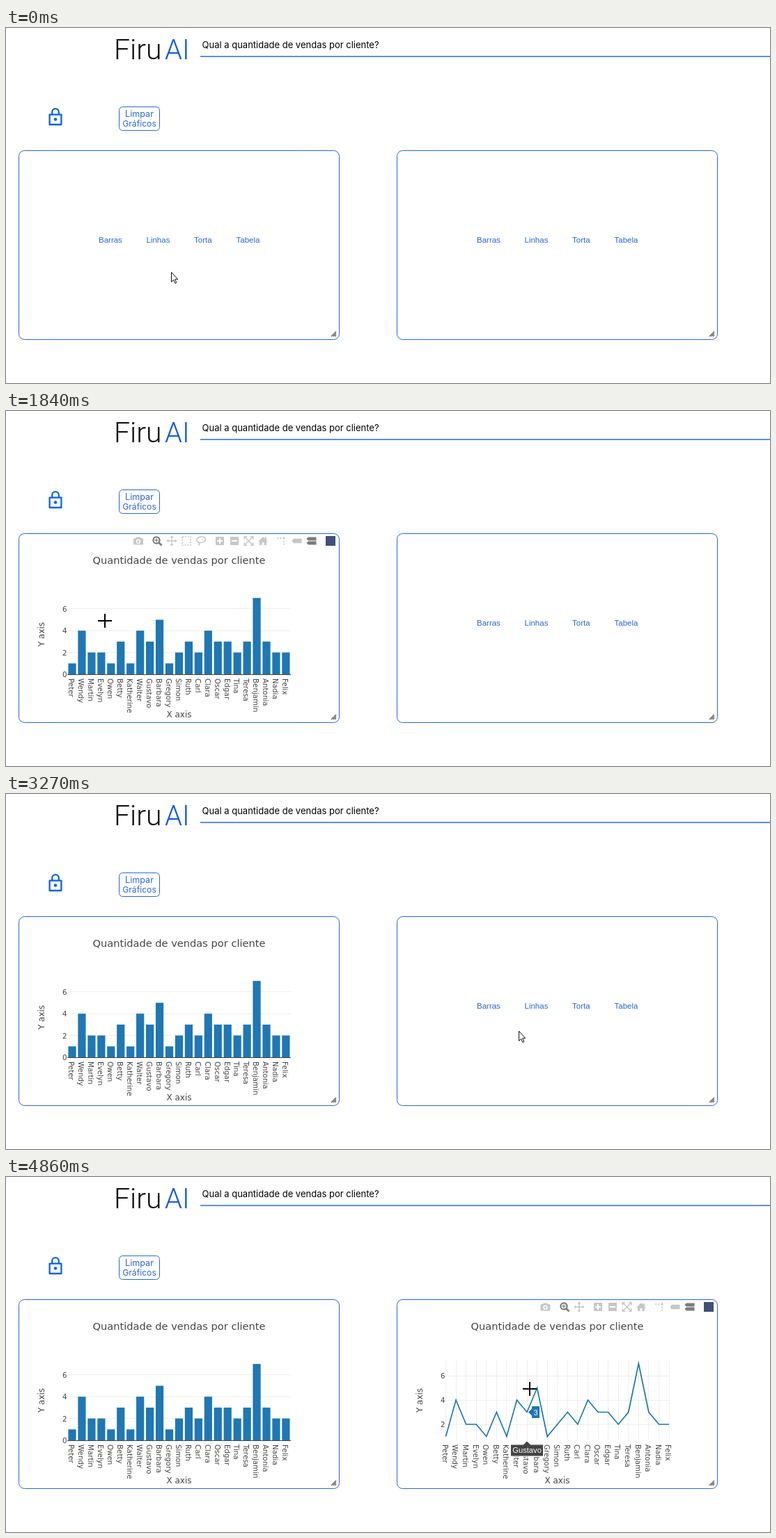
An HTML page with a canvas for the animation above (5.2 s loop, 1097 by 511 pixels).

```html
<!DOCTYPE html>
<html lang="pt">
<head>
<meta charset="utf-8">
<title>Vendas por cliente</title>
<style>
  html, body { margin: 0; width: 100%; height: 100%; overflow: hidden; background: #fff; }
  canvas { display: block; }
</style>
</head>
<body>
<canvas id="stage" width="1097" height="511"></canvas>
<script>
const ctx = document.getElementById('stage').getContext('2d');
const LOOP = 5200, SHIFT = 543;
const BLUE = '#1459e6', EDGE = '#2b66dc', PLOT = '#1f77b4', INK = '#444';
const ARIAL = '"Liberation Sans", Arial, sans-serif';
const VERDANA = '"DejaVu Sans", Verdana, sans-serif';
const INTER = 'Inter, sans-serif';

const names = ('Peter Wendy Martin Evelyn Owen Betty Katherine Walter Gustavo Barbara Gregory Simon ' +
  'Ruth Carl Clara Oscar Edgar Tina Teresa Benjamin Antonia Nadia Felix').split(' ');
const sales = [...'14221314351232433237322'].map(Number);
const options = [['Barras', 133], ['Linhas', 201.5], ['Torta', 270], ['Tabela', 330.5]];

const bars = { x: i => 95 + i * 13.95, y: v => 379 - v * 15.7 };
const lines = { x: i => 631.5 + i * 14.57, y: v => 391 - v * 17.5 };

// Pointer path: time, x, y
const path = [
  [0, 237, 351], [20, 237, 351], [300, 186, 337], [540, 151, 321], [680, 146, 310.5],
  [1080, 142, 302], [1930, 142, 302], [2030, 146, 302], [2180, 196, 308], [2340, 276, 322],
  [2430, 320, 328], [2570, 401, 338], [2800, 560, 360], [3110, 709, 369], [3270, 736, 341],
  [3420, 745, 321], [3650, 753, 309], [4790, 753, 309], [4860, 752, 305], [LOOP, 752, 305]
];
const shapes = [
  [550, 'arrow'], [1510, 'hand'], [1550, 'arrow'], [2590, 'cross'],
  [3415, 'arrow'], [4100, 'hand'], [4180, 'arrow'], [LOOP, 'cross']
];

const arrow = new Path2D('M.5 .5V14.5L3.5 11.6L5.8 16.6L7.8 15.7L5.6 10.8H9.8Z');
const hand = new Path2D('M-1.6 12V1.5a1.6 1.6 0 0 1 3.2 0V7q1.5-.9 2.7.4q1.6-.7 2.5.7q2-.2 2 1.8V13' +
  'q0 2-1.3 4V19.5H-1.2q-.8-3-3.4-5.6q-2.6-3.4-1-4q1.4-.4 4 2.1Z');
const home = new Path2D('M-7 1L0-6L2.8-3.2V-5H5V-1L7 1H5V6H1.5V2H-1.5V6H-5V1Z');
const lasso = new Path2D('M-3.5 2C-9-1-5-6 1-6S9 0 2 2C0 3-3 3-4 1.5M-3.5 2q2 2 0 4.5');
const lock = new Path2D('M-7 9H7V21H-7ZM-4 9V6a4 4 0 0 1 8 0V9');

const clamp = v => Math.max(0, Math.min(1, v));
const crisp = v => Math.floor(v) + .5;

// CSS "ease"
function ease(x) {
  x = clamp(x);
  let lo = 0, hi = 1, s = 0;
  for (let i = 0; i < 20; i++) {
    s = (lo + hi) / 2;
    const bx = .75 * s * (1 - s) ** 2 + .75 * s * s * (1 - s) + s ** 3;
    if (bx < x) lo = s; else hi = s;
  }
  return .3 * s * (1 - s) ** 2 + 3 * s * s * (1 - s) + s ** 3;
}

function pointer(t) {
  const i = Math.max(1, path.findIndex(p => p[0] >= t));
  const [t0, x0, y0] = path[i - 1], [t1, x1, y1] = path[i];
  const k = clamp((t - t0) / (t1 - t0));
  return [x0 + (x1 - x0) * k, y0 + (y1 - y0) * k];
}

function text(str, x, y, font, color, align = 'left') {
  ctx.font = font;
  ctx.fillStyle = color;
  ctx.textAlign = align;
  ctx.fillText(str, x, y);
}

function turned(str, x, y, angle, font, align) {
  ctx.save();
  ctx.translate(x, y);
  ctx.rotate(angle);
  text(str, 0, 0, font, INK, align);
  ctx.restore();
}

function rounded(x, y, w, h, r) {
  ctx.beginPath();
  ctx.roundRect(x, y, w, h, r);
}

function line(color, width, ...pts) {
  ctx.strokeStyle = color;
  ctx.lineWidth = width;
  ctx.beginPath();
  pts.forEach(p => ctx.lineTo(...p));
  ctx.stroke();
}

function shape(fill, stroke, pts) {
  ctx.beginPath();
  pts.forEach(p => ctx.lineTo(...p));
  ctx.closePath();
  ctx.fillStyle = fill;
  ctx.fill();
  ctx.strokeStyle = stroke;
  ctx.lineWidth = 1;
  ctx.stroke();
}

function padlock() {
  ctx.save();
  ctx.translate(71, 113.8);
  ctx.scale(1.2, 1.2);
  ctx.strokeStyle = ctx.fillStyle = '#0d62e6';
  ctx.lineWidth = 1.9;
  ctx.lineJoin = 'round';
  ctx.stroke(lock);
  ctx.beginPath();
  ctx.arc(0, 14.8, 1.9, 0, 7);
  ctx.fill();
  ctx.restore();
}

function header() {
  text('Firu', 155, 45, '300 41px Roboto, sans-serif', '#111');
  text('AI', 228, 45, '300 40px Roboto, sans-serif', BLUE);
  text('Qual a quantidade de vendas por cliente?', 281.5, 28.5, `400 13px ${INTER}`, '#000');
  line(EDGE, 1.3, [279, 41], [1097, 41]);
  padlock();
  ctx.strokeStyle = EDGE;
  ctx.lineWidth = 1;
  rounded(162.5, 113.5, 58, 34, 5);
  ctx.stroke();
  text('Limpar', 191.5, 128, `400 12.6px ${INTER}`, EDGE, 'center');
  text('Gráficos', 191.5, 142, `400 12.2px ${INTER}`, EDGE, 'center');
}

function panel(ox) {
  ctx.strokeStyle = EDGE;
  ctx.lineWidth = 1;
  rounded(18.5 + ox, 176.5, 460, 272, 8);
  ctx.stroke();
  for (const d of [7, 4.5, 2]) line('#555', 1.1, [474 + ox - d, 444], [474 + ox, 444 - d]);
}

function menu(ox, active, fill) {
  const words = color => options.forEach(([w, x]) => text(w, x + ox, 309, `11.5px ${ARIAL}`, color));
  words(EDGE);
  if (fill <= 0) return;
  const left = options[active][1] - 16.5 + ox;
  ctx.save();
  ctx.beginPath();
  ctx.rect(left, 290, 68 * fill, 31);
  ctx.clip();
  ctx.fillStyle = BLUE;
  rounded(left, 290.6, 68, 29.6, 5);
  ctx.fill();
  words('#fff');
  ctx.restore();
}

function titles(ox) {
  text('Quantidade de vendas por cliente', 248.5 + ox, 220, `14.6px ${VERDANA}`, INK, 'center');
  text('X axis', 248.5 + ox, 441, `12px ${VERDANA}`, INK, 'center');
  turned('Y axis', 55 + ox, 321.5, -Math.PI / 2, `12px ${VERDANA}`, 'center');
}

function ticks(scale, right, values) {
  const font = `10.3px ${VERDANA}`;
  values.forEach(v => text(v, right, scale.y(v) + 4, font, INK, 'right'));
  names.forEach((n, i) => turned(n, scale.x(i) - 4.7, 385, Math.PI / 2, font, 'left'));
}

function barChart() {
  titles(0);
  [2, 4, 6].forEach(v => line('#eee', 1, [88, crisp(bars.y(v))], [409, crisp(bars.y(v))]));
  ctx.fillStyle = PLOT;
  sales.forEach((v, i) => ctx.fillRect(bars.x(i) - 5.6, bars.y(v), 11.2, 379 - bars.y(v)));
  line(INK, 1, [88, 379.5], [409, 379.5]);
  ticks(bars, 87.5, [0, 2, 4, 6]);
}

function lineChart() {
  titles(SHIFT);
  names.forEach((n, i) => line('#eee', 1, [crisp(lines.x(i)), 264], [crisp(lines.x(i)), 379]));
  [2, 4, 6].forEach(v => line('#eee', 1, [631, crisp(lines.y(v))], [952, crisp(lines.y(v))]));
  line(PLOT, 1.7, ...sales.map((v, i) => [lines.x(i), lines.y(v)]));
  ticks(lines, 630.5, [2, 4, 6]);
}

// Toolbar icons, each drawn around its own centre
const icons = {
  camera() {
    rounded(-7, -4, 14, 9.5, 1.5);
    ctx.fill();
    ctx.fillRect(-3, -5.5, 6, 2);
    ctx.fillStyle = '#fff';
    ctx.beginPath();
    ctx.arc(0, .8, 3.2, 0, 7);
    ctx.fill();
    ctx.fillStyle = '#c7c7c7';
    ctx.beginPath();
    ctx.arc(0, .8, 1.7, 0, 7);
    ctx.fill();
  },
  zoom(c) {
    ctx.lineWidth = 2.2;
    ctx.beginPath();
    ctx.arc(-1, -1, 4.6, 0, 7);
    ctx.stroke();
    line(c, 2.6, [2.5, 2.5], [6.5, 6.5]);
    line(c, 1.3, [-3.5, -1], [1.5, -1]);
    line(c, 1.3, [-1, -3.5], [-1, 1.5]);
  },
  pan(c) {
    line(c, 1.4, [-6, 0], [6, 0]);
    line(c, 1.4, [0, -6], [0, 6]);
    for (let i = 0; i < 4; i++) {
      ctx.rotate(Math.PI / 2);
      shape(c, c, [[5, -1.7], [7, 0], [5, 1.7]]);
    }
  },
  select() {
    ctx.lineWidth = 1.6;
    ctx.setLineDash([2, 1.8]);
    ctx.strokeRect(-6, -6, 12, 12);
  },
  lasso() { ctx.lineWidth = 1.6; ctx.stroke(lasso); },
  plus() { icons.minus(); ctx.fillRect(-1, -4, 2, 8); },
  minus() {
    rounded(-6, -6, 12, 12, 1);
    ctx.fill();
    ctx.fillStyle = '#fff';
    ctx.fillRect(-4, -1, 8, 2);
  },
  fit(c) {
    line(c, 1.5, [-5.5, -5.5], [5.5, 5.5]);
    line(c, 1.5, [-5.5, 5.5], [5.5, -5.5]);
    for (let i = 0; i < 4; i++) {
      ctx.rotate(Math.PI / 2);
      line(c, 1.6, [-6.2, -2.5], [-6.2, -6.2], [-2.5, -6.2]);
    }
  },
  home() { ctx.fill(home); },
  spike(c) {
    ctx.setLineDash([1.8, 2]);
    line(c, 1.8, [-5.5, -4], [2, -4]);
    line(c, 1.8, [4, 0], [4, 6]);
    ctx.fillRect(2.5, -5.5, 3, 3);
  },
  tag() { tag(0, 3.3); },
  tags() { tag(-3, 2.4); tag(3, 2.4); },
  square() { ctx.fillStyle = '#40507a'; ctx.fillRect(-7, -7, 14, 14); }
};

function tag(y, h) {
  ctx.beginPath();
  [[-7, 0], [-4.5, -h], [7, -h], [7, h], [-4.5, h]].forEach(([a, b]) => ctx.lineTo(a, y + b));
  ctx.fill();
}

function toolbar(ox, alpha, full) {
  if (alpha <= 0) return;
  const items = [['camera', full ? 190 : 231.5], ['zoom', full ? 217 : 259], ['pan', full ? 238 : 280],
    ['plus', 307], ['minus', 328], ['fit', 348.5], ['home', 369], ['spike', 395], ['tag', 417.5],
    ['tags', 438.5], ['square', 466]];
  if (full) items.push(['select', 259], ['lasso', 280]);
  for (const [kind, x] of items) {
    const color = kind === 'zoom' || kind === 'tags' ? '#7c7c7c' : '#c7c7c7';
    ctx.save();
    ctx.globalAlpha = alpha;
    ctx.translate(x + ox, 187);
    ctx.fillStyle = ctx.strokeStyle = color;
    icons[kind](color);
    ctx.restore();
  }
}

function hover(scale, i, edge) {
  const cx = scale.x(i), x = cx + edge, y = scale.y(sales[i]);
  const font = `11.2px ${ARIAL}`;
  shape(PLOT, '#fff', [[0, 0], [5, -5], [5, -9], [17, -9], [17, 9], [5, 9], [5, 5]].map(([a, b]) => [x + a, y + b]));
  text(sales[i], x + 11, y + 4, font, '#fff', 'center');
  ctx.font = font;
  const w = ctx.measureText(names[i]).width / 2 + 2.7;
  shape(INK, '#fff', [[0, 380], [5, 385], [w, 385], [w, 402], [-w, 402], [-w, 385], [-5, 385]].map(([a, b]) => [cx + a, b]));
  text(names[i], cx, 397, font, '#fff', 'center');
}

function cursor(t) {
  const [x, y] = pointer(t), kind = shapes.find(s => t < s[0])[1];
  if (kind === 'cross') {
    line('#000', 2, [x - 10, y], [x + 10, y]);
    line('#000', 2, [x, y - 10], [x, y + 10]);
    return;
  }
  const outline = kind === 'hand' ? hand : arrow;
  ctx.save();
  ctx.translate(x, y);
  ctx.fillStyle = '#fff';
  ctx.fill(outline);
  ctx.strokeStyle = '#111';
  ctx.lineWidth = 1;
  ctx.stroke(outline);
  if (kind === 'hand') {
    line('#111', .9, [1.6, 7], [1.6, 10.5]);
    line('#111', .9, [4.3, 7.4], [4.3, 10.5]);
    line('#111', .9, [6.8, 8.1], [6.8, 10.5]);
  }
  ctx.restore();
}

function draw(t) {
  ctx.fillStyle = '#fff';
  ctx.fillRect(0, 0, 1097, 511);
  header();
  panel(0);
  panel(SHIFT);

  if (t < 1510) menu(0, 0, ease((t - 552) / 600));
  else if (t >= 1550) {
    barChart();
    toolbar(0, ease((t - 1540) / 300) - ease((t - 2680) / 300), true);
    if (t >= 2050 && t < 2590) {
      const i = Math.round((pointer(t - 90)[0] - bars.x(0)) / 13.95);
      hover(bars, Math.min(22, i), 5.6);
    }
  }

  if (t < 4120) menu(SHIFT, 1, ease((t - 3412) / 600));
  else if (t >= 4180) {
    lineChart();
    toolbar(SHIFT, ease((t - 4210) / 300), false);
    if (t >= 4840) hover(lines, 8, 1.5);
  }
  cursor(t);
}

function tick() {
  draw(performance.now() % LOOP);
  requestAnimationFrame(tick);
}
tick();
</script>
</body>
</html>
```
